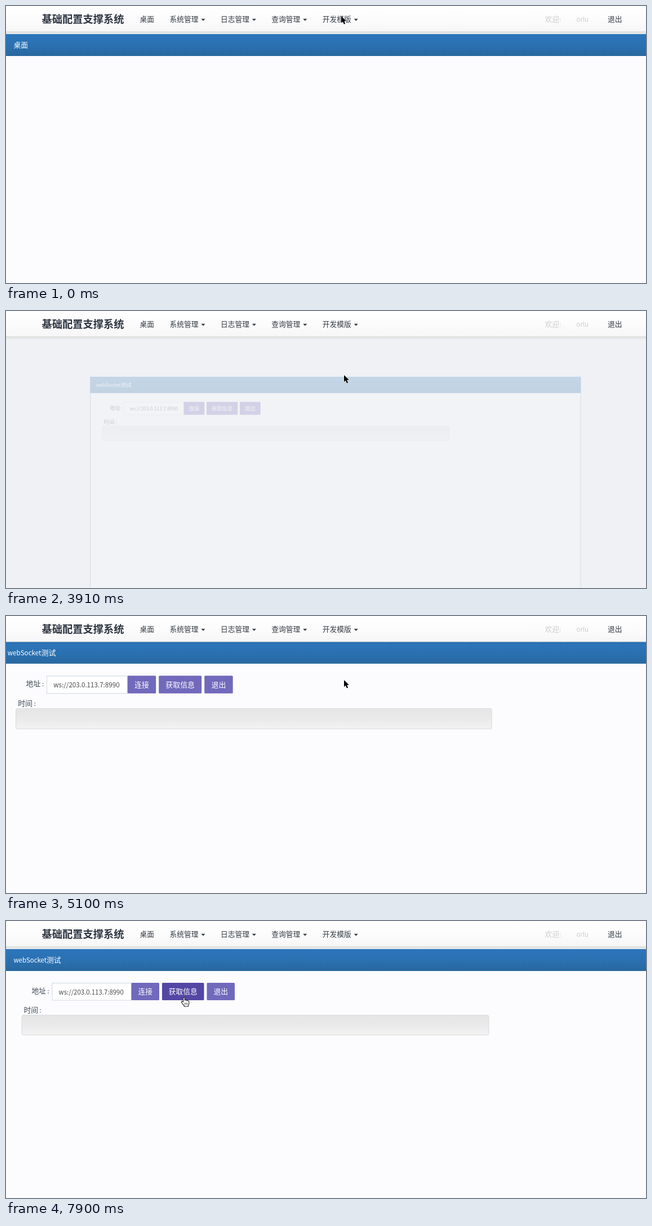
Animation of 1136x493 px, one loop 8 s. Source, as an HTML page:

```html
<!DOCTYPE html>
<html lang="zh-CN">
<head>
<meta charset="utf-8">
<style>
html, body { margin: 0; width: 100%; height: 100%; overflow: hidden; background: #eff1f4; }
svg { display: block; width: 1136px; height: 493px; font-family: "Noto Sans CJK SC", "Noto Sans CJK", sans-serif; }
text { white-space: pre; }
</style>
</head>
<body>
<svg id="stage" viewBox="0 0 1136 493"></svg>
<script>
const DURATION = 8000;
const OPEN_AT = 380;      // menu unfolds
const CLICK_AT = 3660;    // menu item chosen
const FONT = 12.75, LATIN_RATIO = 0.895;
const CENTER = [584, 311];
const stage = document.getElementById('stage');

function add(parent, tag, attrs = {}) {
  const node = document.createElementNS('http://www.w3.org/2000/svg', tag);
  for (const key in attrs) node.setAttribute(key, attrs[key]);
  parent.appendChild(node);
  return node;
}
const group = parent => add(parent, 'g');
const rect = (parent, x, y, width, height, fill, more) =>
  add(parent, 'rect', { x, y, width, height, fill, ...more });

// Latin runs are set a little smaller than the Chinese characters.
function label(parent, x, middle, content, fill, size = FONT, weight = 400) {
  const node = add(parent, 'text', { x, y: middle + size * 0.37, fill, 'font-size': size, 'font-weight': weight });
  for (const run of content.match(/[ -~]+|[^ -~]+/g)) {
    const latin = run.charCodeAt(0) < 128;
    add(node, 'tspan', { 'font-size': latin ? size * LATIN_RATIO : size }).textContent = run;
  }
  return node;
}

const defs = add(stage, 'defs');
function gradient(id, ...colors) {
  const node = add(defs, 'linearGradient', { id, x1: 0, y1: 0, x2: 0, y2: 1 });
  colors.forEach((color, i) =>
    add(node, 'stop', { offset: i / (colors.length - 1), 'stop-color': color }));
  return `url(#${id})`;
}
const navFill = gradient('nav', '#ffffff', '#fcfcfd', '#f6f6f7');
const barFill = gradient('bar', '#2c76bb', '#2a71b2', '#28679f');
const wellFill = gradient('well', '#e5e5e5', '#eaeaeb', '#f3f3f3');
const openFill = gradient('open', '#d2d2d2', '#dcdcdc', '#dadada');
const hoverFill = gradient('hover', '#f8f8fa', '#e7e7e9');
const shadowFill = gradient('shade', 'rgba(0,0,0,.08)', 'rgba(0,0,0,0)');

function makePanel(title) {
  const panel = group(stage);
  rect(panel, -0.5, 50.5, 1171.5, 800, '#fcfcfe', { stroke: '#3a80bd' });
  rect(panel, -1, 50, 1172.5, 39, barFill);
  label(panel, 13.5, 69.5, title, '#fff', FONT, 500);
  return panel;
}

const desktop = makePanel('桌面');
const panel = makePanel('webSocket测试');
label(panel, 45.5, 124, '地址 :', '#414b55');
rect(panel, 82, 110.5, 140.5, 30.5, '#fff', { stroke: '#cfd8e0' });
label(panel, 93.5, 126, 'ws://203.0.113.7:8990', '#4a4a4a');
label(panel, 31.5, 158, '时间 :', '#414b55');
rect(panel, 28, 167.5, 829, 35.5, wellFill, { stroke: '#dadada', rx: 3 });

const buttons = [['连接', 222.5, 49.5], ['获取信息', 277, 74.5], ['退出', 356.5, 49.5]].map(([name, x, width]) => {
  const box = rect(panel, x, 110, width, 31, '#7169bb', { rx: 1.5 });
  label(panel, x + (width - name.length * FONT) / 2, 125.5, name, '#fff', FONT, 500);
  return { box, x, width };
});

const nav = group(stage);
rect(nav, 0, 46, 1136, 5, shadowFill);
rect(nav, 0, 0, 1136, 46, navFill);
rect(nav, 0, 45.3, 1136, 1, '#dcddd2');
const openTab = rect(nav, 548, 0, 90.5, 46, openFill);
label(nav, 63.5, 23, '基础配置支撑系统', '#2d3540', 18.25, 700);
label(nav, 237.5, 23, '桌面', '#333b42');
const tabs = ['系统管理', '日志管理', '查询管理', '开发模版'].map((name, i) => {
  const x = 290.5 + i * 90.4;
  add(nav, 'path', { d: `M${x + 55.9} 22.7h7.2l-3.6 3.7z`, fill: '#333b42' });
  return label(nav, x, 23, name, '#333b42');
});
label(nav, 956.5, 23, '欢迎:', '#cccccc');
label(nav, 1012.5, 23, 'orlu', '#cccccc');
label(nav, 1068, 23, '退出', '#333b42');

const menu = group(stage);
rect(menu, 547, 47, 148, 84, 'rgba(0,0,0,.05)', { rx: 5 });
rect(menu, 548, 47, 146, 82.5, 'rgba(0,0,0,.09)', { rx: 4 });
add(menu, 'path', { d: 'M548.5 46.5h145v78q0 3-3 3h-139q-3 0-3-3z', fill: '#fdfdfe', stroke: '#c3c3c3' });
const highlight = rect(menu, 549, 0, 144, 24, hoverFill);
['流程配置', '请假流程', 'WebSocket测试'].forEach((name, i) =>
  label(menu, 567.5, 63 + i * 24, name, '#333'));

const cursor = group(stage);
const arrow = add(cursor, 'path', {
  d: 'M0 0V12.2L2.8 9.6L4.9 14.4L7.1 13.5L5 8.8H8.8Z',
  fill: '#000', stroke: '#fff', 'stroke-width': 1, 'paint-order': 'stroke'
});
const hand = group(cursor);
add(hand, 'path', {
  d: 'M-1.4 8V1.2Q-1.4 0 -.1 0Q1.2 0 1.2 1.2V5Q3.2 3.8 4 5.3Q5.8 4.6 6.5 6Q8.8 5.6 8.8 8V10.5Q8.6 12.6 7.5 14V16H.2V14.5Q-2.8 11.6 -4.4 8.8Q-5 7.2 -3.5 6.9Q-2.3 7 -1.4 8Z',
  fill: '#fff', stroke: '#222', 'stroke-width': 1.1, 'stroke-linejoin': 'round'
});
add(hand, 'path', { d: 'M1.5 9.5v3.5M3.6 9.5v3.5M5.7 9.5v3.5', stroke: '#222', 'stroke-width': 0.8 });

// Keys are [time, ...values]; values are blended linearly.
function track(keys, time) {
  const next = keys.findIndex(key => key[0] > time);
  if (next < 0) return keys[keys.length - 1].slice(1);
  if (next === 0) return keys[0].slice(1);
  const from = keys[next - 1], to = keys[next];
  const mix = (time - from[0]) / (to[0] - from[0]);
  return from.slice(1).map((value, i) => value + (to[i + 1] - value) * mix);
}

const cursorKeys = [
  [0, 595, 18], [850, 597, 21], [1670, 600, 32], [2390, 602, 116], [2850, 601, 113],
  [3300, 600, 114], [6800, 600, 114], [7200, 460, 133], [7500, 345, 140], [7850, 316, 136]
];
const scaleKeys = [
  [3660, 0.68], [3910, 0.7425], [4540, 0.919], [4820, 0.978], [5100, 1.0187], [5260, 1.021],
  [5500, 1.011], [5760, 0.9967], [5950, 0.9955], [6500, 1]
];
const opacityKeys = [[3680, 0], [3910, 0.22], [4540, 0.91], [4750, 1]];

const show = (node, visible) => node.setAttribute('display', visible ? 'inline' : 'none');

function render(time) {
  const [x, y] = track(cursorKeys, time);
  const [scale] = track(scaleKeys, time);
  const menuOpen = time >= OPEN_AT && time < CLICK_AT;
  const loaded = time >= CLICK_AT;

  show(desktop, !loaded);
  show(panel, loaded);
  panel.setAttribute('opacity', track(opacityKeys, time)[0]);
  panel.setAttribute('transform',
    `translate(${CENTER}) scale(${scale}) translate(${-CENTER[0]} ${-CENTER[1]})`);

  show(menu, menuOpen);
  show(openTab, menuOpen);
  tabs[3].setAttribute('fill', menuOpen ? '#555' : '#333b42');
  const item = Math.floor((y - 51) / 24);
  show(highlight, item >= 0 && item < 3);
  highlight.setAttribute('y', 51 + item * 24);

  let overButton = false;
  for (const { box, x: left, width } of buttons) {
    const hovered = loaded && x >= left && x <= left + width && y >= 110 && y <= 141;
    box.setAttribute('fill', hovered ? '#5247a4' : '#7169bb');
    overButton ||= hovered;
  }
  const pointing = menuOpen || overButton;
  show(hand, pointing);
  show(arrow, !pointing);
  cursor.setAttribute('transform', `translate(${x} ${y})`);
}

const start = performance.now();
function frame() {
  render((performance.now() - start) % DURATION);
  requestAnimationFrame(frame);
}
frame();
</script>
</body>
</html>
```
